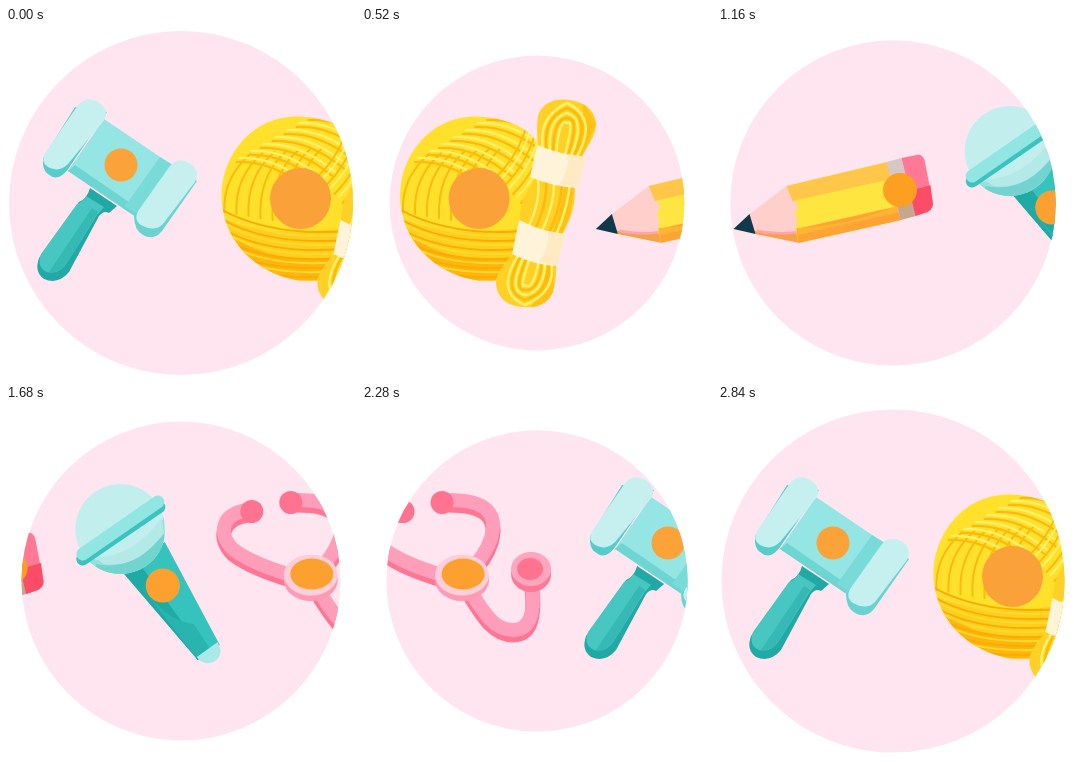
Recreate the animation shown at these times as an HTML page. Size 350x350 px, loop 2.88 s.

```html
<!DOCTYPE html>
<html lang="en">
<head>
<meta charset="utf-8">
<title>Craft items</title>
<style>
  html, body { margin: 0; width: 100%; height: 100%; overflow: hidden; background: #fff; }
  svg { display: block; width: 100vw; height: 100vh; }
  .line { fill: none; stroke-linecap: round; stroke-linejoin: round; }
</style>
</head>
<body>
<svg viewBox="0 0 350 350">
  <defs>
    <clipPath id="lens"><circle id="lensCircle" cx="175" cy="175" r="172"/></clipPath>
    <clipPath id="ballClip"><path id="ballShape" d="M39 166C40 136 56 110 80 97C103 84 134 87 157 98C180 110 194 138 193 171C191 215 166 253 126 253C85 252 39 220 39 166Z"/></clipPath>
    <clipPath id="hankClip"><path id="hankShape" d="M177 88C180 76 193 70 207 72C222 73 235 82 235 97C234 112 222 122 218 136C211 151 216 166 212 180C209 195 201 204 198 217C193 231 197 244 193 260C190 274 177 281 163 279C148 279 134 270 135 253C137 239 151 231 154 218C160 204 157 193 160 179C163 165 173 157 176 143C179 126 174 104 177 88Z"/></clipPath>
    <clipPath id="micClip"><circle cx="114.5" cy="123" r="45"/></clipPath>

    <g id="hammer">
      <path d="M84 160L111 178L103 185Q98 182 93 188L63 244Q52 257 38 251Q28 244 33 230L73 174Q81 171 84 160Z" fill="#21a9a6"/>
      <path d="M80 168L98 179L91 187L61 235Q53 247 41 244Q30 239 35 226L71 176Q77 174 80 168Z" fill="#48c6c2"/>
      <path d="M86 180L92 184L60 236Q52 246 43 244Z" fill="#36b8b4"/>
      <path d="M98 91L166 137L130 189L62 143Z" fill="#94e5e4"/>
      <path d="M69 137L130 179V189L62 143Z" fill="#6dd6d3"/>
      <path d="M154 129L167 137L133 187L119 178Z" fill="#78dbd8"/>
      <path d="M37 130L69 79L101 84L62 141Q52 155 42 146Q36 142 37 130Z" fill="#55cdca"/>
      <path d="M72 77Q80 68 90 73Q103 79 99 91L62 136Q53 145 42 139Q34 134 39 125Z" fill="#c5f0ef"/>
      <path d="M128 188L167 136L191 153L156 203Q148 213 137 207Q128 202 128 188Z" fill="#68d3d0"/>
      <path d="M164 138Q172 129 183 135Q195 142 189 154L157 196Q149 204 137 198Q127 193 132 183Z" fill="#c5f0ef"/>
      <circle cx="115" cy="137" r="16.5" fill="#fba238"/>
    </g>

    <g id="yarn">
      <use href="#ballShape" fill="#ffe02a"/>
      <g clip-path="url(#ballClip)">
        <path d="M37 188Q88 216 197 194V260H37Z" fill="#ffd01b"/>
        <path d="M37 198Q92 248 184 222L155 258H60Z" fill="#ffb60c"/>
        <g id="ballStrands" class="line"></g>
      </g>
      <circle cx="118" cy="170.5" r="30.5" fill="#faa13a"/>
      <use href="#hankShape" fill="#ffd126"/>
      <g clip-path="url(#hankClip)">
        <path d="M222 73L235 96L216 139L209 187L193 224L192 282H168Q191 245 188 214Q203 173 206 139Q224 105 222 73Z" fill="#ffc116"/>
        <g id="hankStrands" class="line"></g>
      </g>
      <path d="M176 117Q200 127 225 129L217 160Q192 159 169 149Z" fill="#fff4d9"/>
      <path d="M207 126L225 129L217 160L198 157Q209 141 207 126Z" fill="#ffeac3"/>
      <path d="M158 192Q181 204 204 206L196 238Q173 237 151 226Z" fill="#fff4d9"/>
      <path d="M187 203L204 206L196 238L178 234Q189 218 187 203Z" fill="#ffeac3"/>
    </g>

    <g id="pencil">
      <path d="M141 186L178 158L194 164V214L147 206Z" fill="#ffcfcc"/>
      <path d="M146 203L192 205L191 215L147 206Z" fill="#f6a24d"/>
      <path d="M149 203Q169 207 190 204" class="line" stroke="#ffa5ab" stroke-width="2.5"/>
      <path d="M125 201L141 186L147 206Z" fill="#103a4b"/>
      <path d="M178 158L279 134L293 192L190 215L187 201Q190 193 186 185Q193 178 184 171Z" fill="#ffe540"/>
      <path d="M178 158L279 134L283 151L184 173Z" fill="#ffc64a"/>
      <path d="M188 201L290 178L293 192L190 215Z" fill="#ffa335"/>
      <path d="M188 200Q240 198 290 177L291 184L190 207Z" fill="#ffb532"/>
      <path d="M278 134L293 130L307 188L292 192Z" fill="#d6c8c5"/>
      <path d="M288 174L303 171L307 188L292 192Z" fill="#c6a78d"/>
      <path d="M293 130L308 127Q314 126 316 132L324 173Q326 180 319 184L307 188Z" fill="#ff7895"/>
      <path d="M301 163L322 157L324 173Q326 180 319 184L307 188Z" fill="#fc4c68"/>
      <circle cx="291.5" cy="162" r="17" fill="#fda022"/>
    </g>

    <g id="mic">
      <path d="M115 164L159 136L214 239L192 254Z" fill="#36c3be"/>
      <path d="M115 164L131 154L199 247L192 254Z" fill="#20aaa6"/>
      <path d="M132 176Q159 215 188 218L205 244L192 254Z" fill="#29b4af"/>
      <path d="M191 251L212 236L215 245Q214 255 204 257Q196 258 191 251Z" fill="#aae9e6"/>
      <g clip-path="url(#micClip)">
        <path d="M69 77H160V169H69Z" fill="#c2efed"/>
        <path d="M75 150Q118 166 158 112L162 170H76Z" fill="#98e0dd"/>
        <path d="M90 158Q127 166 158 128L162 170H90Z" fill="#72d3cf"/>
        <path d="M88 151Q125 153 156 112L158 127Q132 163 98 158Z" fill="#b3eae7"/>
      </g>
      <path d="M77 153L153 101" class="line" stroke="#3dc3bf" stroke-width="13"/>
      <path d="M77 148L152 96" class="line" stroke="#91e6e3" stroke-width="13"/>
      <circle cx="157" cy="179.5" r="17" fill="#fca12f"/>
    </g>

    <g id="stethoscope">
      <g class="line" stroke="#ff7594" stroke-width="15">
        <path id="tubes" d="M37 109C10 113 7 133 22 148Q40 162 80 174M87 99C125 99 136 113 129 137Q123 156 104 173M108 190C122 212 132 229 151 229C174 229 172 198 169 174"/>
      </g>
      <g class="line" stroke="#ff9ebb" stroke-width="14">
        <use href="#tubes" y="-5"/>
      </g>
      <circle cx="41" cy="105.5" r="11.5" fill="#ff7391"/>
      <circle cx="80" cy="96.5" r="11.5" fill="#ff7391"/>
      <ellipse cx="100" cy="174" rx="27" ry="21" fill="#ff9ab5"/>
      <ellipse cx="100" cy="169" rx="27" ry="20.5" fill="#ffcedb"/>
      <ellipse cx="101" cy="168" rx="21.5" ry="15.5" fill="#fca12f"/>
      <ellipse cx="169" cy="168" rx="20" ry="18" fill="#ff7894"/>
      <ellipse cx="169" cy="163" rx="20" ry="17" fill="#ffa6bf"/>
      <ellipse cx="168" cy="163" rx="13" ry="11" fill="#ff7391"/>
    </g>
  </defs>

  <g clip-path="url(#lens)">
    <rect width="350" height="350" fill="#ffe5f0"/>
    <g id="strip">
      <use href="#hammer"/>
      <use href="#yarn" x="176.5"/>
      <use href="#pencil" x="286.3"/>
      <use href="#mic" x="573"/>
      <use href="#stethoscope" x="778"/>
      <use href="#hammer" x="969"/>
      <use href="#yarn" x="1145.5"/>
    </g>
  </g>
</svg>
<script>
const byId = id => document.getElementById(id);

function addStrand(group, d, color, width) {
  const path = document.createElementNS("http://www.w3.org/2000/svg", "path");
  path.setAttribute("d", d);
  path.setAttribute("stroke", color);
  path.setAttribute("stroke-width", width);
  group.append(path);
}

const SHADE = "#fbbb0c", GLOW = "#fff06a";

// Each bundle of the ball is a row of parallel curves.
const ball = byId("ballStrands");
for (let i = 0; i < 7; i++) {
  const x = 42 + i * 12;
  addStrand(ball, `M${x} ${184 + i * 2}Q${x - 2} ${150 - i} ${x + 26} ${126 - i}`, SHADE, 2);
}
for (let i = 0; i < 7; i++) {
  const x = 54 + i * 12, y = 134 - i * 7;
  addStrand(ball, `M${x} ${y}Q${x + 35} ${y - 2} ${x + 72} ${y + 28}`, SHADE, 2);
  addStrand(ball, `M${x + 3} ${y - 4}Q${x + 38} ${y - 6} ${x + 75} ${y + 24}`, GLOW, 2);
}
for (let i = 0; i < 6; i++) {
  const x = 136 + i * 8, y = 148 + i * 9;
  addStrand(ball, `M${x} ${y}Q${x + 22} ${y - 22} ${x + 30} ${y - 52}`, SHADE, 2);
  addStrand(ball, `M${x + 4} ${y + 3}Q${x + 26} ${y - 19} ${x + 34} ${y - 49}`, GLOW, 2);
}
for (let i = 0; i < 6; i++) {
  const y = i * 11;
  addStrand(ball, `M${36 + i * 3} ${180 + y}Q95 ${214 + y * 0.8} 190 ${200 + y * 0.8}`, "#f9ac04", 2);
  addStrand(ball, `M${38 + i * 3} ${184 + y}Q95 ${218 + y * 0.8} 190 ${204 + y * 0.8}`, "#ffd935", 2);
}

// The hank's ends are nested loops; its middle is a bundle of curves.
const hank = byId("hankStrands");
for (let i = 0; i < 5; i++) {
  const color = i % 2 ? SHADE : GLOW;
  const w = 30 - i * 6;
  addStrand(hank, `M${198 - w / 2} 126Q${204 - w} 90 206 ${75 + i * 5}Q${208 + w} 90 ${200 + w / 2} 130`, color, 2.5);
  addStrand(hank, `M${177 + i * 8} 151Q${180 + i * 7} 177 ${163 + i * 8} 207`, color, 2.5);
  addStrand(hank, `M${173 - w / 2} 226Q${163 - w} 264 164 ${277 - i * 5}Q${166 + w} 264 ${175 + w / 2} 232`, color, 2.5);
}

const LOOP = 2880, STEP = 40, PULSE = 960;
const SPEED = 969 / (LOOP - STEP);
const start = performance.now();

function draw(now) {
  const elapsed = Math.max(0, now - start) % LOOP;
  const time = Math.floor(elapsed / STEP) * STEP;
  const radius = 159.5 + 12.5 * Math.cos(2 * Math.PI * time / PULSE);
  byId("lensCircle").setAttribute("r", radius);
  byId("strip").setAttribute("transform", `translate(${-SPEED * time})`);
  requestAnimationFrame(draw);
}
draw(start);
</script>
</body>
</html>
```
